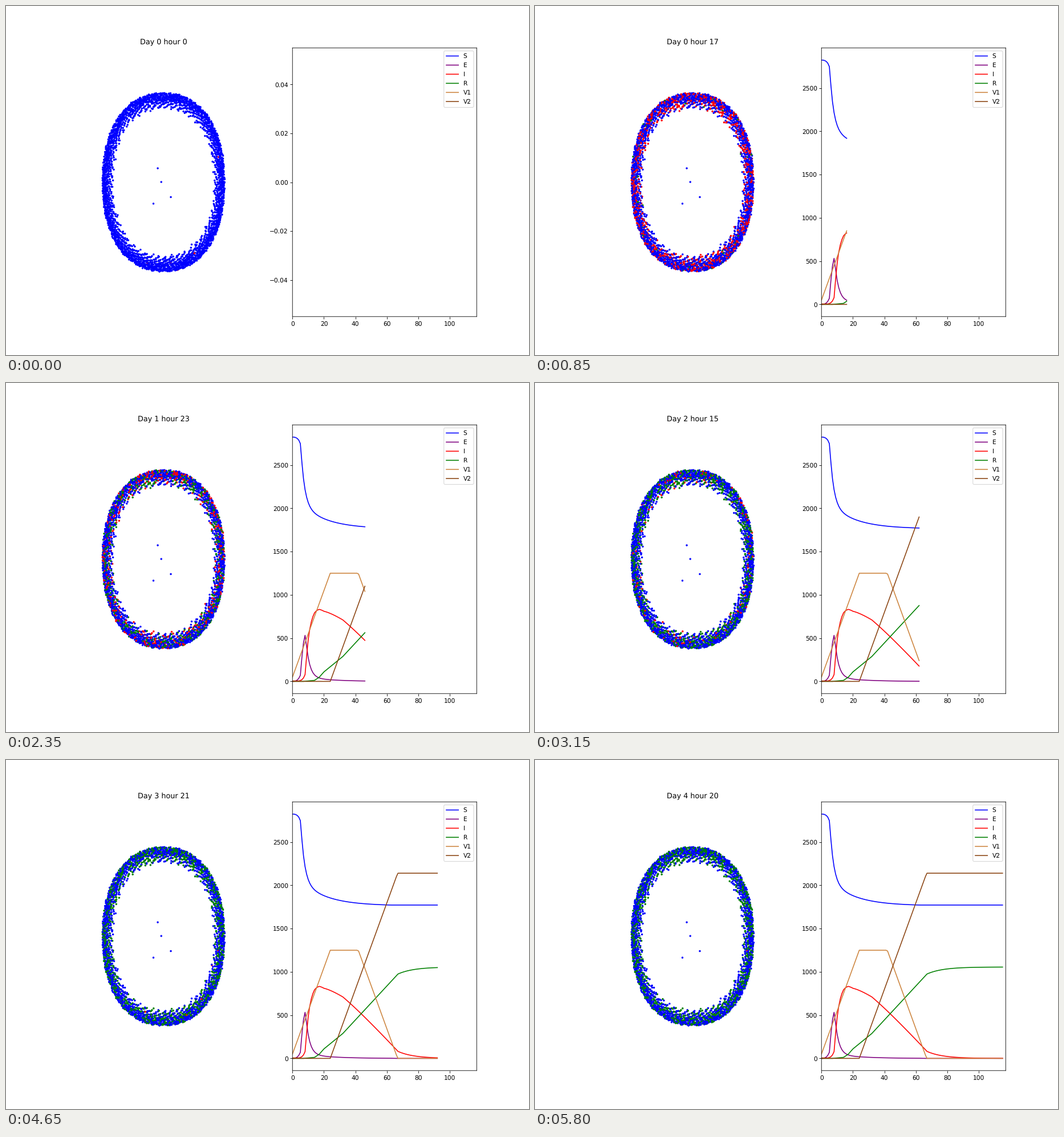
Animation, 917 px wide and 611 px high, one loop 5.85 s. Source, as a matplotlib script:

```python
import numpy as np
import matplotlib.pyplot as plt
from matplotlib.animation import FuncAnimation

plt.rcParams.update({"path.snap": False, "text.hinting": "none"})

DPI = 76.4167
HOURS = 117
N = 2828      # people
CASES = 1056  # ever infected
DOSES = 2140
COLORS = {"S": "blue", "E": "purple", "I": "red", "R": "green",
          "V1": "peru", "V2": "saddlebrown"}

rng = np.random.default_rng(7)
hours = np.arange(HOURS)


def infected(t):
    """Cumulative infections: doubling at first, then two-speed saturation."""
    growth = np.maximum(5, 5 * 2.0 ** (np.minimum(t, 5) - 1))
    decay = 1064 - 489 * np.exp((6 - t) / 2.33) - 277 * np.exp((6 - t) / 16)
    return np.where(t < 6, growth, np.minimum(decay, CASES))


def recovered(t):
    """Nearly linear recovery, then an exponential tail."""
    ramp = np.interp(t, [0, 7, 14, 17, 20, 32, 67],
                     [0, 0, 12, 48, 110, 288, 975])
    return np.where(t > 67, CASES - 81 * np.exp((67 - t) / 10), ramp)


cases = infected(hours)
ill = infected(hours - 3)  # three hours of incubation
R = recovered(hours)
V2 = np.clip(50 * (hours - 24), 0, DOSES)
V1 = np.minimum(50 * (hours + 1), DOSES) - V2
series = dict(S=N - cases, E=cases - ill, I=ill - R, R=R, V1=V1, V2=V2)

# Evenly spread people on a rounded ring that thins out inwards
k = np.arange(N)
phi = 2 * np.pi * (0.7548776662 * k % 1)
depth = 0.19 * (1 - np.sqrt(1 - 0.5698402910 * k % 1))
c, s = np.cos(phi), np.sin(phi)
rim = 1.008 * (abs(c) ** 2.25 + abs(s) ** 2.25) ** (-1 / 2.25)
pos = np.column_stack([c, s]) * (rim * (1 - depth))[:, None]
pos += rng.normal(0, 0.004, pos.shape)
pos[-4:] = [(-0.095, 0.158), (-0.037, 0.003), (0.121, -0.168),
            (-0.166, -0.242)]

# Order of infection; the four in the middle stay healthy
rank = np.append(rng.permutation(N - 4), range(N - 4, N))
palette = np.array([COLORS[state] for state in "RIES"])

fig, (net, ax) = plt.subplots(
    1, 2, figsize=((917 + 1e-6) / DPI, (611 + 1e-6) / DPI), dpi=DPI)
net.axis("off")
net.set(xlim=(-1.52, 1.52), ylim=(-1.52, 1.52))
dots = net.scatter(*pos.T, s=5, c="blue", linewidths=1)
title = net.set_title("")

lines = {name: ax.plot([], [], color=color, label=name)[0]
         for name, color in COLORS.items()}
ax.set_xlim(0, HOURS)
ax.legend(loc="upper right")


def update(i):
    title.set_text(f"Day {i // 24} hour {i % 24}")
    limits = np.round([R[i], ill[i], cases[i]])
    dots.set_color(palette[np.searchsorted(limits, rank, side="right")])
    for name, line in lines.items():
        line.set_data(hours[:i], series[name][:i])
    top = series["S"][0] if i else 0
    ax.set_ylim(*((-0.05 * top, 1.05 * top) if i else (-0.055, 0.055)))


anim = FuncAnimation(fig, update, frames=HOURS, interval=50, repeat=True,
                     init_func=lambda: update(0))
plt.show()
```
